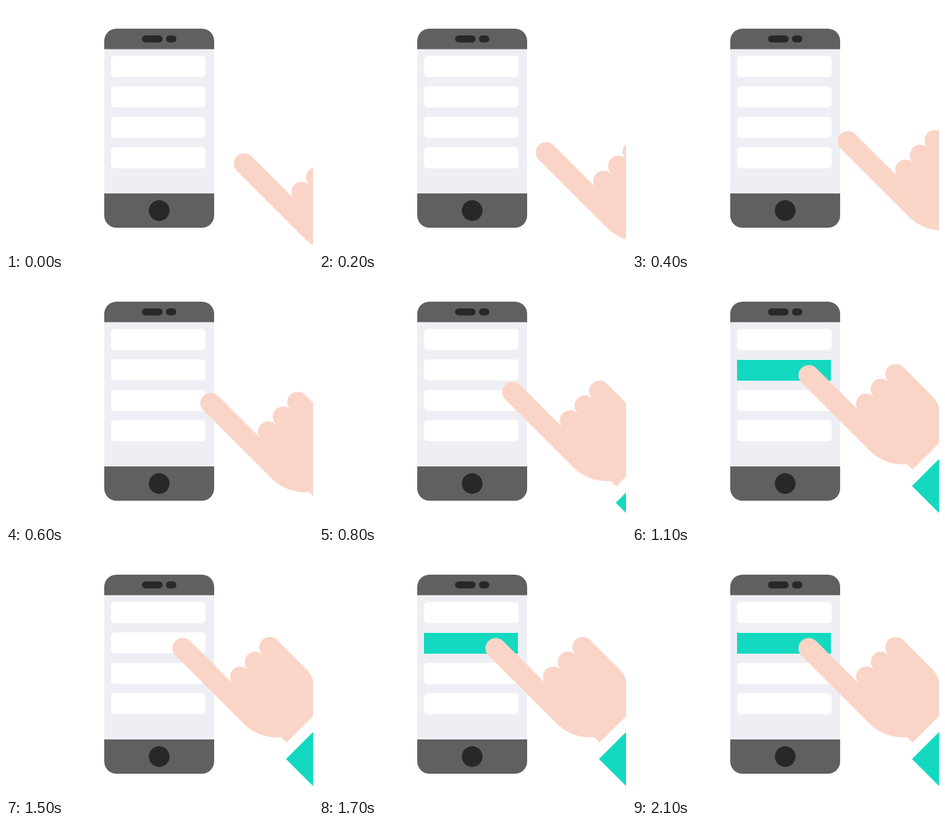
Animation, 500 px wide and 400 px high, one loop 4100 ms. Source, as an HTML page:

```html
<!DOCTYPE html>
<html lang="en">
<head>
<meta charset="utf-8">
<title>Tap on a phone</title>
<style>
  html, body { margin: 0; width: 100%; height: 100%; overflow: hidden; background: #fff; }
  svg { display: block; width: 500px; height: 400px; }
  .body { fill: #606060; }
  .dark { fill: #272928; }
  .screen { fill: #eeeff4; }
  .field { fill: #fff; }
  .accent { fill: #13d9c1; }
  .skin { fill: #fad4c7; }
  .finger { fill: none; stroke: #fad4c7; stroke-width: 33.6; stroke-linecap: round; }
</style>
</head>
<body>
<svg viewBox="0 0 500 400">
  <rect class="body" x="160" y="37" width="179" height="325" rx="20"/>
  <rect class="screen" x="160" y="70.5" width="179" height="235.5"/>
  <rect class="dark" x="221.5" y="48" width="33.6" height="11.4" rx="5.7"/>
  <rect class="dark" x="260.5" y="48" width="17" height="11.4" rx="5.7"/>
  <circle class="dark" cx="249.5" cy="334" r="16.9"/>
  <g id="fields"></g>
  <rect id="highlight" class="accent" x="171" y="132" width="153" height="34"/>
  <g id="hand">
    <path class="finger" d="M287.9 157.2 L399.9 269.2"/>
    <g id="knuckles"></g>
    <path class="skin" d="M369.6 215.4 L441.4 143.6 L489 191.2 A45 45 0 0 1 502 223
      L520 248 L457 311 L448 302.3 A75 75 0 0 1 388 281 Z"/>
    <path class="accent" d="M456 338 L530 264 L620 354 L546 428 Z"/>
  </g>
</svg>
<script>
  const LOOP = 4100;
  const REACH = 1100;
  const byId = id => document.getElementById(id);

  function add(parent, tag, attributes) {
    const node = document.createElementNS(parent.namespaceURI, tag);
    for (const [name, value] of Object.entries(attributes)) node.setAttribute(name, value);
    parent.append(node);
  }

  for (let i = 0; i < 4; i++) {
    add(byId('fields'), 'rect',
      { class: 'field', x: 171, y: 81.5 + i * 49.7, width: 154, height: 34.4, rx: 6 });
  }
  for (let i = 0; i < 3; i++) {
    add(byId('knuckles'), 'circle',
      { class: 'skin', cx: 381.7 + i * 23.9, cy: 203.7 - i * 24.1, r: 16.8 });
  }

  const timing = { duration: LOOP, iterations: Infinity };

  // The hand arrives in eleven equal steps of 100 ms.
  byId('hand').animate([
    { transform: 'translate(100px, 100px)', easing: 'steps(11, end)' },
    { transform: 'translate(0, 0)', offset: REACH / LOOP },
    { transform: 'translate(0, 0)' }
  ], timing);

  // The chosen field blinks, then stays lit.
  const blink = [[0, 0], [1100, 1], [1500, 0], [1700, 1], [1900, 0], [2100, 1], [LOOP, 1]];
  byId('highlight').animate(
    blink.map(([time, opacity]) => ({ offset: time / LOOP, opacity, easing: 'steps(1, end)' })),
    timing);
</script>
</body>
</html>
```
